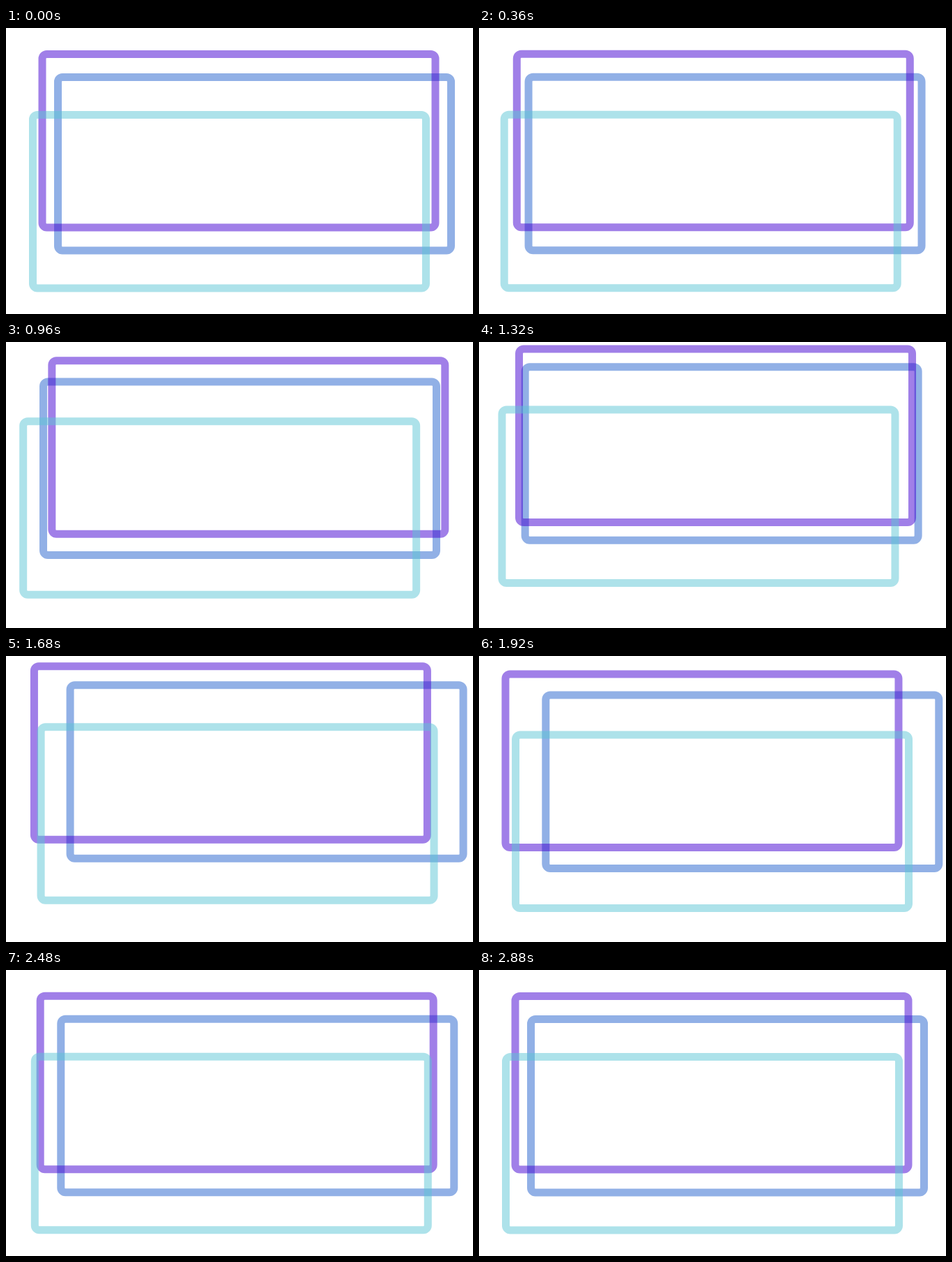
Write an HTML page with a canvas that moves like this. It is 670 px wide and 410 px high and loops after 3 s.

```html
<!DOCTYPE html>
<html lang="en">
<head>
<meta charset="utf-8">
<title>Orbiting frames</title>
<style>
  html, body { margin: 0; width: 100%; height: 100%; overflow: hidden; background: #fff; }
  canvas { display: block; }
</style>
</head>
<body>
<canvas id="stage" width="670" height="410"></canvas>
<script>
const ctx = document.getElementById('stage').getContext('2d');
const LOOP = 3000, STEP = 40;
const WIDTH = 564, HEIGHT = 248.5, LINE = 11, RADIUS = 6.5;

// Outer top left corner at rest, signed orbit radii, colour; back to front.
const boxes = [
  { x: 69, y: 65, rx: -21.7, ry: 18.1, color: '#2563cd' },
  { x: 46.5, y: 32, rx: 14.3, ry: 14.35, color: '#4201d1' },
  { x: 33, y: 119, rx: -14.3, ry: 14.35, color: '#5dc5d5' }
];

// Eased progress around the orbit: time in ms, share of a full turn.
const keys = [
  [0, 0], [320, 0.02], [640, 0.084], [960, 0.209], [1160, 0.331], [1320, 0.437],
  [1680, 0.65], [2200, 0.904], [2560, 0.98], [2880, 1]
];

const secant = i => (keys[i + 1][1] - keys[i][1]) / (keys[i + 1][0] - keys[i][0]);

function slope(i) {
  if (i === 0 || i === keys.length - 1) return 0;
  const before = keys[i][0] - keys[i - 1][0];
  const after = keys[i + 1][0] - keys[i][0];
  return (secant(i - 1) * after + secant(i) * before) / (before + after);
}

// Smooth cubic interpolation between the keys.
function progress(t) {
  const next = keys.findIndex(k => k[0] > t);
  if (next < 0) return 1;
  const i = next - 1;
  const [t0, p0] = keys[i], [t1, p1] = keys[next];
  const span = t1 - t0, u = (t - t0) / span, v = 1 - u;
  return p0 * (1 + 2 * u) * v * v + p1 * (3 - 2 * u) * u * u
    + span * u * v * (slope(i) * v - slope(next) * u);
}

function drawBox(box, angle) {
  const x = box.x + box.rx * Math.sin(angle) + LINE / 2;
  const y = box.y - box.ry * (1 - Math.cos(angle)) + LINE / 2;
  ctx.strokeStyle = box.color;
  ctx.beginPath();
  ctx.roundRect(x, y, WIDTH, HEIGHT, RADIUS);
  ctx.stroke();
}

function draw(now) {
  const t = Math.floor((now % LOOP) / STEP) * STEP;
  const angle = 2 * Math.PI * progress(t);
  ctx.globalAlpha = 1;
  ctx.fillStyle = '#fff';
  ctx.fillRect(0, 0, 670, 410);
  ctx.globalAlpha = 0.5;
  ctx.lineWidth = LINE;
  boxes.forEach(box => drawBox(box, angle));
}

const start = performance.now();
function tick() {
  draw(performance.now() - start);
  requestAnimationFrame(tick);
}
tick();
</script>
</body>
</html>
```
